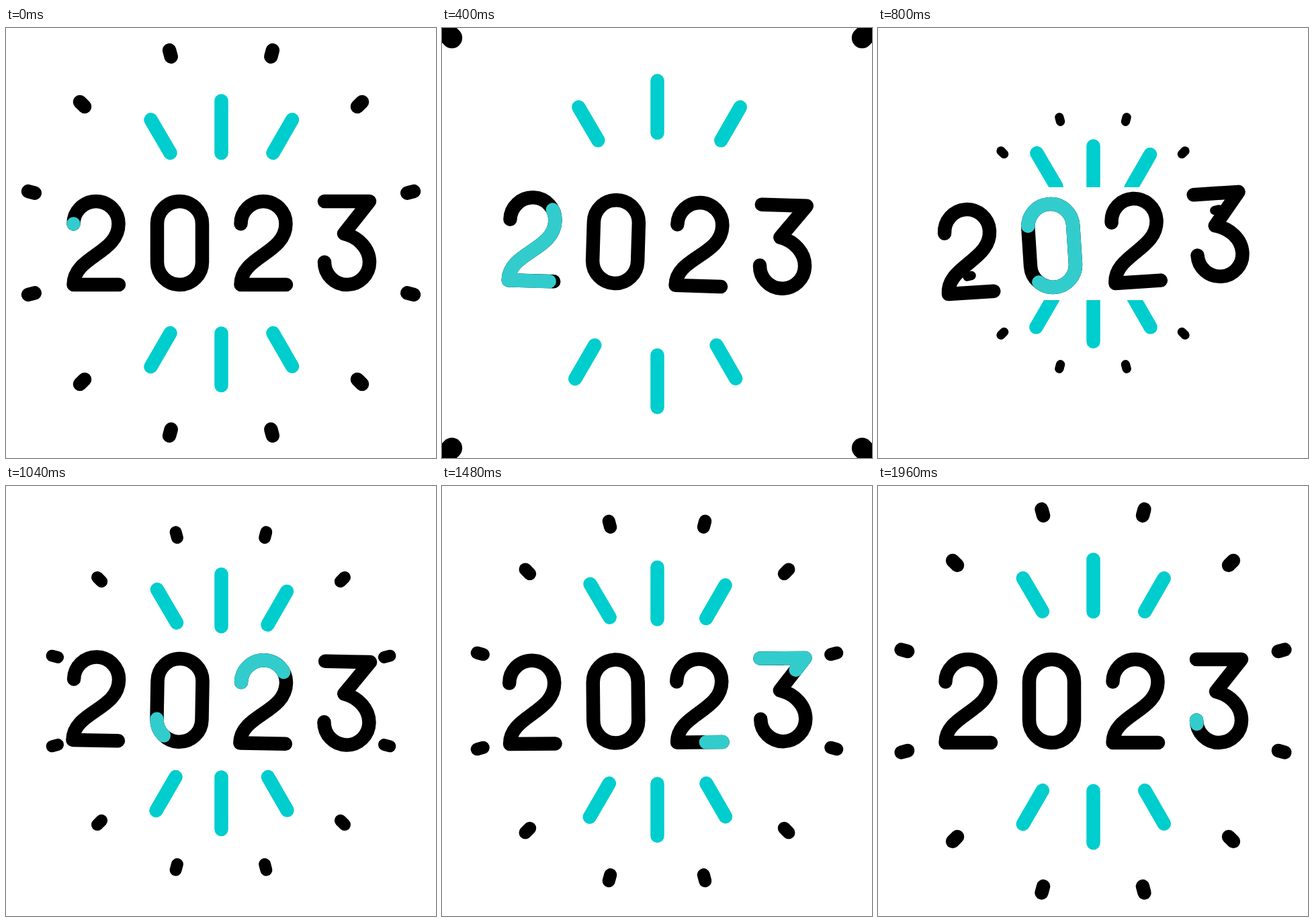
These frames come from a looping animation (640 px wide and 640 px high, 2000 ms). An HTML page:

```html
<!DOCTYPE html>
<html>
<head>
<meta charset="utf-8">
<style>
html, body { margin: 0; width: 100%; height: 100%; overflow: hidden; background: #fff }
svg { display: block; width: 100vw; height: 100vh }
path { fill: none; stroke: #000; stroke-width: 20.5; stroke-linecap: round; stroke-linejoin: round }
#rays path { stroke: #00cdcd }
#digits .trace { stroke: #33cccc }
</style>
</head>
<body>
<svg viewBox="0 0 640 640">
  <g id="rays"></g>
  <rect y="237" width="640" height="168" fill="#fff"/>
  <g id="dots"></g>
  <g id="digits"></g>
</svg>
<script>
const LOOP = 2000, RESET = 600, SETTLE = 1040;
const $ = id => document.getElementById(id);

function addPath(parent, d, className = '') {
  const p = document.createElementNS('http://www.w3.org/2000/svg', 'path');
  p.setAttribute('d', d);
  p.setAttribute('class', className);
  parent.append(p);
  return p;
}

const clamp = u => Math.min(1, Math.max(0, u));
const smooth = u => (u = clamp(u), u * u * (3 - 2 * u));

// Each ray: line, then its offsets at 400, 800 and 1040 ms
const rays = [
  ['M215.5 136.5L244.5 186', [-12, -18.5], [21, 50], [9.5, 17.5]],
  ['M320.5 108.5V186', [0, -29.5], [0, 67.5], [0, 23]],
  ['M426 136.5L397.5 186', [17.5, -18.5], [-21, 52], [-8, 20.5]],
  ['M215.5 504L244.5 454', [-17, 18], [20, -59], [8, -21]],
  ['M320.5 532V454.5', [0, 32], [0, -65.5], [0, -21]],
  ['M426 503.5L397.5 454', [11, 18], [-20.5, -58.5], [-7.5, -21]]
].map(([d, out, enter, drift]) => ({ el: addPath($('rays'), d), out, enter, drift }));

for (let i = 0; i < 12; i++)
  addPath($('dots'), 'M0-287V-297').setAttribute('transform', `rotate(${15 + 30 * i})`);

const two = x => `M${x} 291.5a33.5 33.5 0 0 1 67 0c0 44.5-67 48.5-67 90.5h67.5`;
// Each digit: path, then start and end of the trace's head and tail
const digits = [
  [two(100.5), 0, 440, 240, 680],
  ['M225 348.5v-57a33.5 33.5 0 0 1 67 0v57a33.5 33.5 0 0 1-67 0', 440, 880, 680, 1120],
  [two(349.5), 880, 1320, 1120, 1560],
  ['M474 258H541L503 306C524 311 541 328 541 348.5A33.5 33.5 0 0 1 474 348.5', 1320, 1760, 1520, 2000]
].map(([d, ...times]) => {
  addPath($('digits'), d);
  const el = addPath($('digits'), d, 'trace');
  el.setAttribute('pathLength', 1);
  return { el, times };
});

const tilts = [[0, 0], [400, 1.75], [800, -3.7], [1040, 1.05], [1600, -.75], [2000, 0]];

function tilt(t) {
  const i = tilts.findIndex(k => k[0] > t);
  const [t0, a] = tilts[i - 1], [t1, b] = tilts[i];
  return a + (b - a) * smooth((t - t0) / (t1 - t0));
}

// Slow drift through the loop point, a rush outwards before the reset, a braking entry after it
function rayOffset(ray, axis, t) {
  const out = ray.out[axis], enter = ray.enter[axis], drift = ray.drift[axis];
  if (t < RESET) return -drift * t / 960 + (out + drift * 400 / 960) * (t / 400) ** 7;
  const brake = Math.max(0, (SETTLE - t) / 240);
  return drift * (LOOP - t) / 960 + (enter - drift * 1.25) * brake ** 2;
}

function dotScale(t) {
  const rate = .000129;
  if (t < RESET) return 1 + rate * t + .448 * (t / 400) ** 4;
  const brake = Math.max(0, (SETTLE - t) / 240);
  return Math.max(0, 1 - rate * (LOOP - t) - .195 * brake ** 2.37);
}

function draw(t) {
  for (const ray of rays)
    ray.el.setAttribute('transform', `translate(${rayOffset(ray, 0, t)} ${rayOffset(ray, 1, t)})`);
  $('dots').setAttribute('transform', `translate(320 320) scale(${dotScale(t)})`);
  $('digits').setAttribute('transform', `rotate(${tilt(t)} 320 320)`);
  for (const { el, times: [h0, h1, t0, t1] } of digits) {
    const head = smooth((t - h0) / (h1 - h0)), tail = smooth((t - t0) / (t1 - t0));
    el.style.display = head > tail ? '' : 'none';
    el.style.strokeDasharray = `${head - tail} 2`;
    el.style.strokeDashoffset = -tail;
  }
}

const start = performance.now();
function tick() {
  draw((performance.now() - start) % LOOP);
  requestAnimationFrame(tick);
}
tick();
</script>
</body>
</html>
```
